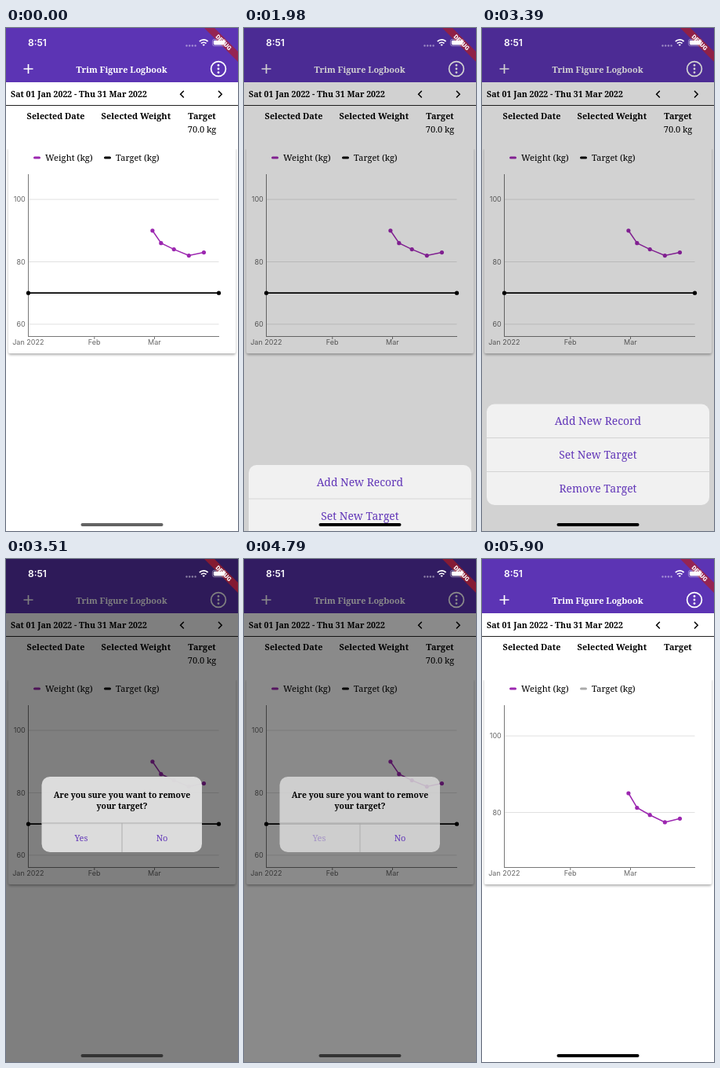
An HTML page that plays this animation: 296x640 px, repeating every 5960 ms.

```html
<!DOCTYPE html>
<html lang="en">
<head>
<meta charset="utf-8">
<title>Trim Figure Logbook</title>
<style>
  html, body { margin: 0; width: 100%; height: 100%; overflow: hidden; background: #fff; }
  svg { display: block; width: 296px; height: 640px; }
  text { font-family: "Noto Serif", serif; font-size: 11px; }
  .b { font-weight: 700; }
  .axis { font: 9px Inter, sans-serif; fill: #666; }
  .mid { text-anchor: middle; }
  .act { fill: #6237b8; text-anchor: middle; }
  .icon { fill: none; stroke: #fff; stroke-width: 1.7; }
  .grid { stroke: #dedede; stroke-width: .9; }
</style>
</head>
<body>
<svg id="stage" viewBox="0 0 296 640" xmlns="http://www.w3.org/2000/svg">
  <defs>
    <filter id="shade" x="-5%" y="-5%" width="110%" height="112%">
      <feDropShadow dx="0" dy="2" stdDeviation="1.6" flood-color="#000" flood-opacity=".3"/>
    </filter>
    <clipPath id="page"><rect y="100" width="296" height="540"/></clipPath>
  </defs>
  <rect width="296" height="640" fill="#fff"/>

  <rect width="296" height="69" fill="#5c34b4"/>
  <path class="icon" d="M22.5 52h12M28.5 46v12"/>
  <text class="b mid" x="147.5" y="56.7" fill="#fff" style="font-size:10.9px">Trim Figure Logbook</text>
  <circle class="icon" cx="271" cy="52" r="9.4"/>
  <g fill="#fff">
    <circle cx="271" cy="47.4" r="1.4"/><circle cx="271" cy="52" r="1.4"/><circle cx="271" cy="56.6" r="1.4"/>
  </g>

  <text class="b" x="6" y="88" style="font-size:10.6px">Sat 01 Jan 2022 - Thu 31 Mar 2022</text>
  <path d="M226.8 80l-4.2 4.3 4.2 4.3M271 80l4.2 4.3-4.2 4.3" fill="none" stroke="#000" stroke-width="1.5"/>
  <path d="M0 98.5h296" stroke="#222"/>
  <g class="b mid" style="font-weight:700">
    <text x="63.5" y="116" style="font-size:10.8px">Selected Date</text>
    <text x="165.8" y="116">Selected Weight</text>
    <text x="250" y="116" style="font-size:10.8px">Target</text>
  </g>
  <text id="goalText" class="mid" x="250" y="133" style="font-size:11.1px">70.0 kg</text>

  <g clip-path="url(#page)">
    <rect x="3" y="151" width="290" height="263" rx="3" fill="#fff" filter="url(#shade)"/>
    <rect x="0" y="146" width="296" height="8" fill="#fff"/>
  </g>
  <g stroke-width="3" stroke-linecap="round">
    <path d="M36.5 165h6" stroke="#9c27b0"/>
    <path id="goalKey" d="M126.5 165h6"/>
  </g>
  <text x="50" y="169" style="font-size:11.2px">Weight (kg)</text>
  <text x="140" y="169" style="font-size:10.9px">Target (kg)</text>

  <g id="ticks"></g>
  <path d="M28.5 186v207M28 392.5h244M112.8 393v3M189.5 393v3" fill="none" stroke="#777"/>
  <g class="mid">
    <text class="axis" x="28.3" y="403.4">Jan 2022</text>
    <text class="axis" x="112.6" y="403.4">Feb</text>
    <text class="axis" x="189.3" y="403.4">Mar</text>
  </g>
  <g id="goal">
    <path d="M28.5 337.2H271.5" stroke="#000" stroke-width="1.7"/>
    <circle cx="28.5" cy="337.2" r="2.6"/><circle cx="271.5" cy="337.2" r="2.6"/>
  </g>
  <g id="series" fill="#9c27b0"></g>

  <rect id="dim" width="296" height="640"/>

  <g id="sheet">
    <rect x="6" y="478.5" width="284" height="128.5" rx="10" fill="#f1f1f1"/>
    <path d="M6 521.5h284M6 564.5h284" stroke="#d2d2d2" stroke-width=".9"/>
    <g style="font-size:13.9px">
      <text class="act" x="148" y="505" style="font-size:inherit">Add New Record</text>
      <text class="act" x="148" y="548" style="font-size:inherit">Set New Target</text>
      <text class="act" x="148" y="591" style="font-size:inherit">Remove Target</text>
    </g>
  </g>

  <g id="dialog">
    <rect id="plate" x="45.5" y="277" width="204.5" height="96" rx="10.5" fill="#e0e0e0"/>
    <g class="mid" style="font-weight:700">
      <text x="148" y="303.5" style="font-size:10.4px">Are you sure you want to remove</text>
      <text x="148" y="318" style="font-size:10.4px">your target?</text>
    </g>
    <path d="M45.5 336h204.5M148 336v37" stroke="#a9a9a9" stroke-width=".9"/>
    <text id="yes" class="act" x="96" y="359">Yes</text>
    <text class="act" x="199" y="359">No</text>
  </g>

  <g transform="translate(296 0) rotate(45)">
    <rect x="-31" y="21.2" width="62" height="9.2" fill="#b71c1c" fill-opacity=".63"/>
    <text class="mid" y="28.6" fill="#fff" style="font:900 7.7px Roboto,sans-serif">DEBUG</text>
  </g>

  <text x="28" y="23" fill="#fff" style="font:600 12px Inter,sans-serif">8:51</text>
  <g fill="#fff" fill-opacity=".45">
    <circle cx="230.5" cy="22.5" r="1.2"/><circle cx="234.2" cy="22.5" r="1.2"/>
    <circle cx="237.9" cy="22.5" r="1.2"/><circle cx="241.6" cy="22.5" r="1.2"/>
  </g>
  <g fill="none" stroke="#fff" stroke-width="1.7">
    <path d="M246.8 17.2a7.6 7.6 0 0 1 10.8 0M249 19.6a4.5 4.5 0 0 1 6.4 0"/>
  </g>
  <path d="M250.6 21.2a2.3 2.3 0 0 1 3.2 0l-1.6 1.8z" fill="#fff"/>
  <rect x="263.4" y="14.4" width="17" height="8.4" rx="2.5" fill="none" stroke="#fff" stroke-opacity=".5" stroke-width=".8"/>
  <rect x="264.8" y="15.8" width="14.2" height="5.6" rx="1.4" fill="#fff"/>

  <rect id="home" x="95.5" y="630" width="105" height="4" rx="2"/>
</svg>
<script>
const LOOP = 5960;
const el = id => document.getElementById(id);
const mix = (a, b, k) => a + (b - a) * k;

// Each step holds until the next one begins.
const idle = { dim: 0, slide: null, box: 0, yes: 1, home: "#000", zoom: 0 };
const steps = [
  [0, { home: "#636363" }],
  [1870, {}],
  [1980, { dim: .18, slide: 77.5 }],
  [2080, { dim: .2, slide: 14 }],
  [2210, { dim: .2, slide: 0 }],
  [3390, { dim: .175, slide: 0 }],
  [3510, { dim: .5, box: .96, home: "#333" }],
  [3620, { dim: .54, box: 1, home: "#333" }],
  [4680, { dim: .54, box: 1, yes: .35, home: "#333" }],
  [4790, { dim: .46, box: .8, yes: .4, home: "#333" }],
  [4900, {}],
  [5560, { zoom: .15 }],
  [5670, { zoom: .45 }],
  [5780, { zoom: .75 }],
  [5900, { zoom: 1 }]
].map(([at, s]) => ({ at, ...idle, ...s }));

// [day of the quarter, kilograms]
const weights = [[58, 90], [62, 86], [68, 84], [75, 82], [82, 83]];
const dayX = d => 28.5 + d * 2.731;

function drawChart(zoom) {
  const tickY = v => mix(297.5, 322.5, zoom) - (v - 80) * mix(3.97, 4.87, zoom);
  const dotY = v => mix(297.5, 344.2, zoom) - (v - 80) * mix(3.97, 4.62, zoom);
  const shown = zoom ? [80, 100] : [60, 80, 100];
  el("ticks").innerHTML = shown.map(v => {
    const y = tickY(v);
    return `<path class="grid" d="M29 ${y}H271.5"/>
      <text class="axis" text-anchor="end" x="24.8" y="${y + 3.2}">${v}</text>`;
  }).join("");
  const dots = weights.map(([d, v]) => [dayX(d), dotY(v)]);
  el("series").innerHTML =
    `<polyline points="${dots.join(" ")}" fill="none" stroke="#9c27b0" stroke-width="1.5"/>` +
    dots.map(([x, y]) => `<circle cx="${x}" cy="${y}" r="2.6"/>`).join("");
}

function show(node, on) {
  node.setAttribute("display", on ? "inline" : "none");
}

function draw(s) {
  drawChart(s.zoom);
  show(el("goal"), !s.zoom);
  show(el("goalText"), !s.zoom);
  el("goalKey").setAttribute("stroke", s.zoom ? "#aaa" : "#000");
  el("dim").setAttribute("opacity", s.dim);
  show(el("sheet"), s.slide !== null);
  el("sheet").setAttribute("transform", `translate(0 ${s.slide || 0})`);
  show(el("dialog"), s.box > 0);
  el("plate").setAttribute("opacity", s.box);
  el("yes").setAttribute("opacity", s.yes);
  el("home").setAttribute("fill", s.home);
}

let current = null;
function tick() {
  const t = performance.now() % LOOP;
  const next = steps.filter(s => s.at <= t).pop();
  if (next !== current) draw(current = next);
  requestAnimationFrame(tick);
}
tick();
</script>
</body>
</html>
```
